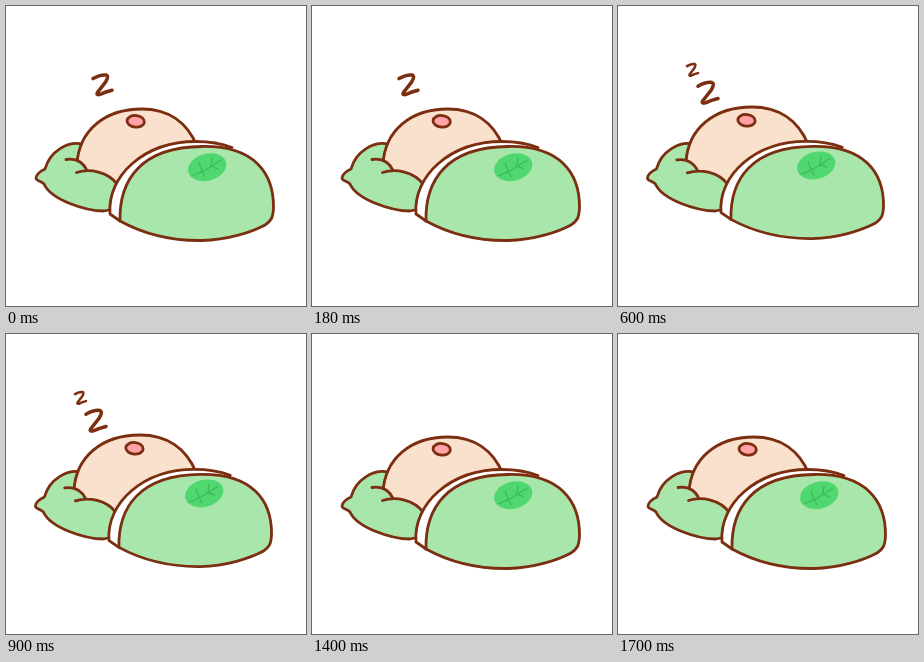
Animation of 300x300 px, one loop 1900 ms. Source, as an HTML page:

```html
<!DOCTYPE html>
<html lang="en">
<head>
<meta charset="utf-8">
<title>Sleeping</title>
<style>
  html, body { margin: 0; width: 100%; height: 100%; overflow: hidden; background: #fff; }
  svg { display: block; width: 100vw; height: 100vh; }
  .ink { stroke: #7b2e10; stroke-width: 2.8; stroke-linecap: round; stroke-linejoin: round; fill: none; }
  .green { fill: #a8e6ac; }
  .skin { fill: #fae1cd; }
  .white { fill: #fff; }
  .pink { fill: #ffa1a6; }
  #bigZ { stroke-width: 3.5; }
  #smallZ { stroke-width: 2.5; }
</style>
</head>
<body>
<svg viewBox="0 0 300 300">
  <g id="pillow">
    <path class="ink green" d="M76 138C62 135 44 145 39 163C34 165 30 169 30 172C30 175 35 175 38 178C45 194 80 205 98 205L112 202L112 160Z"/>
  </g>
  <g id="head">
    <path class="ink skin" d="M71 158C73 125 98 103 136 103C162 103 181 116 191 140L170 190L82 185Z"/>
  </g>
  <g id="pillowFront">
    <path class="green" d="M60 153C71 151 77 157 81 164C95 163 105 169 111 178L106 202L64 192Z"/>
    <path class="ink" d="M60 153.500C70 152 77 156 81 164.500M70.500 166.500C84 162 102 166 111 178"/>
  </g>
  <g id="mouth">
    <ellipse class="ink pink" cx="129.700" cy="115.300" rx="8.700" ry="5.800" transform="rotate(5 129.700 115.300)"/>
  </g>
  <g id="blanket">
    <path class="ink white" d="M114 215L104 208C101 170 138 135.500 190 135.500C203 135.500 214 137 226 141.500L170 190Z"/>
    <path class="ink green" d="M114 215C113 175 134 141 196 140.500C248 139.500 268 167 267.500 202C267 212 265 215 259 219C246 226 222 234 196 234.500C163 235 134 226 114 215Z"/>
  </g>
  <g id="leaf">
    <ellipse fill="#50d770" cx="201.200" cy="161.200" rx="19.500" ry="13.500" transform="rotate(-15 201.200 161.200)"/>
    <path fill="none" stroke="#3dbb5b" stroke-width="1.300" stroke-linecap="round" d="M186 170Q198 166 215 154M196 165L193 157M196 165L199 171M205 160L206 152M205 160L212 163"/>
  </g>
  <path id="bigZ" class="ink"/>
  <path id="smallZ" class="ink"/>
</svg>
<script>
const LOOP = 1900;
const part = id => document.getElementById(id);

// breath: 0 = exhaled, 2 = inhaled; letters: [x, y, width, height]
const poses = [
  { until: 300,  breath: 0, big: [87, 69, 19, 20] },
  { until: 600,  breath: 1, big: [79.5, 64.5, 19, 20] },
  { until: 1100, breath: 2, big: [80, 76.5, 20, 21], small: [69, 58, 11, 12] },
  { until: 1400, breath: 1, big: [72.5, 61.5, 19.5, 20] },
  { until: LOOP, breath: 0 }
];

function letterZ(box) {
  if (!box) return "";
  const [x, y, w, h] = box;
  const at = (u, v) => `${x + u * w} ${y + v * h}`;
  return `M${at(0, .18)}Q${at(.4, -.04)} ${at(.7, 0)}Q${at(.85, .06)} ${at(.66, .36)}` +
    `L${at(.23, .88)}Q${at(.16, 1.03)} ${at(.4, .96)}Q${at(.65, .84)} ${at(1, .76)}`;
}

function draw(now) {
  const time = now % LOOP;
  const { breath: b, big, small } = poses.find(p => time < p.until);
  const place = (id, sx, sy, dx, dy) =>
    part(id).setAttribute("transform", `matrix(${1 + sx * b} 0 0 ${1 + sy * b} ${dx * b} ${dy * b})`);
  place("pillow", 0, 0, -.3, 0);
  place("head", .0084, 0, -2.1, -1);
  place("pillowFront", 0, 0, -.6, .2);
  place("mouth", 0, 0, -.6, -.5);
  place("blanket", -.003, -.01, -.18, 1.35);
  place("leaf", 0, 0, -1.5, -.9);
  part("bigZ").setAttribute("d", letterZ(big));
  part("smallZ").setAttribute("d", letterZ(small));
}

function tick() {
  draw(performance.now());
  requestAnimationFrame(tick);
}
tick();
</script>
</body>
</html>
```
